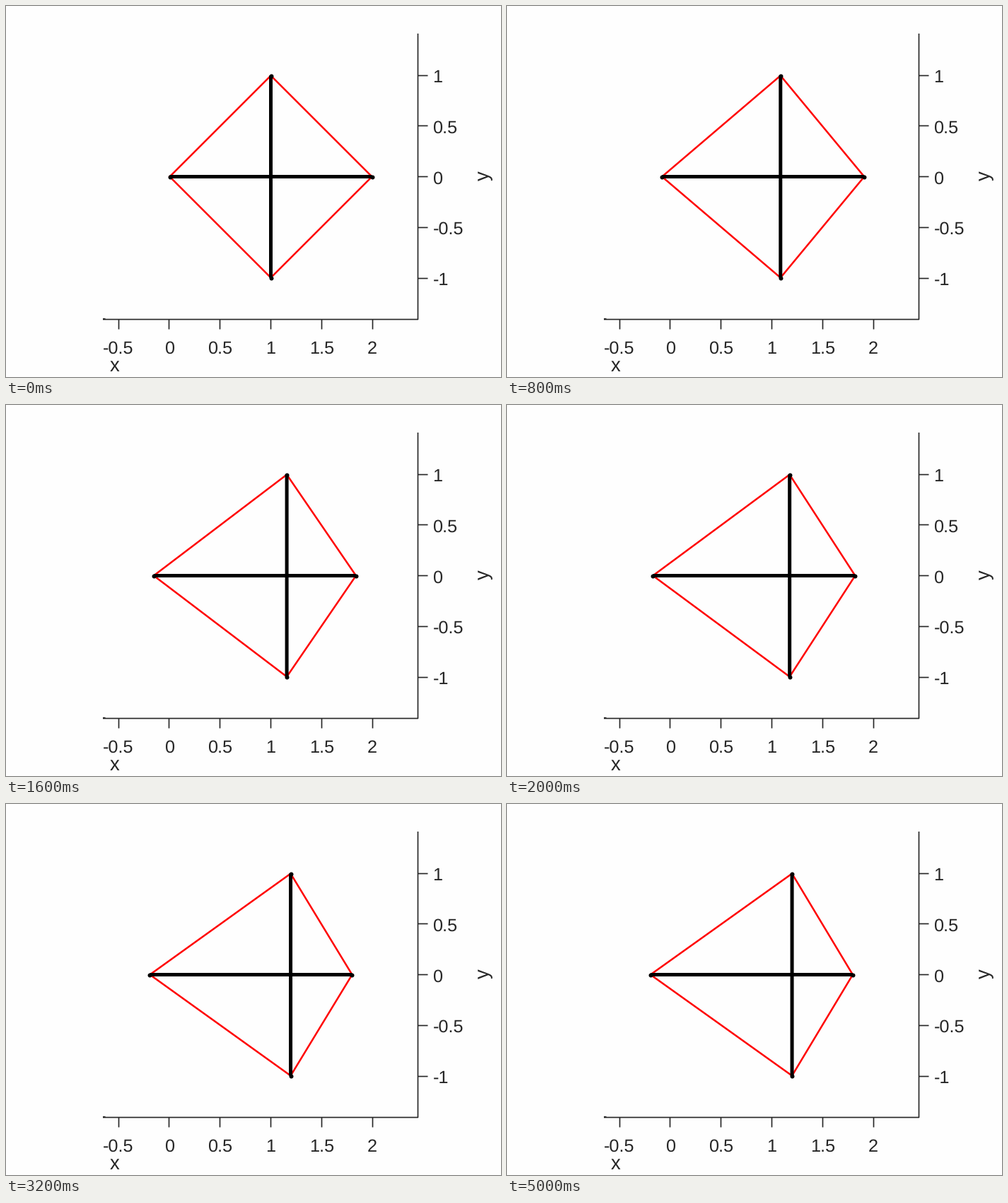
Write a matplotlib script that moves like this. It is 700x525 px and loops after 5100 ms.

```python
import numpy as np
import matplotlib.pyplot as plt
from matplotlib.animation import FuncAnimation

W, H, DPI = 700, 525, 100
FRAMES, INTERVAL = 51, 100
PT = 72 / DPI                # points per pixel
CX, CY = 374.5, 241.5        # stage position of the data point (1, 0)
TICK_UNIT, BODY_UNIT = 143.6, 143
RIGHT, BASE = 582.5, 443.5   # the two axis lines
SHIFT, RATE = 0.2, 0.183     # final offset and damping per frame
INK = "#262626"

plt.rcParams["font.family"] = "Liberation Sans"
plt.rcParams["text.hinting"] = "none"

fig = plt.figure(figsize=(W / DPI, H / DPI), dpi=DPI, facecolor="#fefefe")
ax = fig.add_axes([0, 0, 1, 1])
ax.set_xlim(0, W)
ax.set_ylim(H, 0)
ax.axis("off")


def place(x, y, unit):
    return CX + unit * (np.asarray(x) - 1), CY - unit * np.asarray(y)


def rule(xs, ys):
    ax.plot(xs, ys, color=INK, lw=1.67 * PT, solid_capstyle="butt",
            snap=False)


def label(x, y, text, size=25.2, **kw):
    ax.text(x, y, text, color=INK, fontsize=size * PT, va="baseline", **kw)


# Axes with ticks and labels; the depth axis is seen almost end-on
rule([137, RIGHT, RIGHT], [BASE, BASE, 39])
rule([137, 140.5], [BASE - 0.8] * 2)
for v in np.arange(-0.5, 2.1, 0.5):
    x, _ = place(v, 0, TICK_UNIT)
    rule([np.floor(x) + 0.5] * 2, [BASE, 457.5])
    label(x, 492, f"{v:g}", ha="center")
for v in np.arange(-1, 1.1, 0.5):
    _, y = place(0, v, TICK_UNIT)
    rule([RIGHT, 596.5], [np.floor(y + 0.2) + 0.5] * 2)
    label(603.4, y + 9.9, f"{v:g}", ha="left")
label(154, 517, "x", 27.5, ha="center")
label(683, 240, "y", 27.5, ha="center", rotation=90, rotation_mode="anchor")

# Elastic outline, two rigid bars and their end points
outline, = ax.plot([], [], color="red", lw=2.5 * PT, solid_joinstyle="miter")
bars = [ax.plot([], [], color="black", lw=5 * PT, solid_capstyle="butt",
                snap=False)[0] for _ in range(2)]
dots, = ax.plot([], [], "o", color="black", ms=6 * PT, mew=0, snap=False)


def draw(i):
    # Critically damped approach to the resting offset
    s = SHIFT * (1 - (1 + RATE * i) * np.exp(-RATE * i))
    xs, ys = place([-s, 1 + s, 2 - s, 1 + s], [0, 1, 0, -1], BODY_UNIT)
    outline.set_data(np.append(xs, xs[0]), np.append(ys, ys[0]))
    for k, bar in enumerate(bars):
        bar.set_data(xs[k::2], ys[k::2])
    dots.set_data(xs, ys)
    return [outline, *bars, dots]


anim = FuncAnimation(fig, draw, frames=FRAMES, interval=INTERVAL,
                     repeat=True, repeat_delay=0)
plt.show()
```
